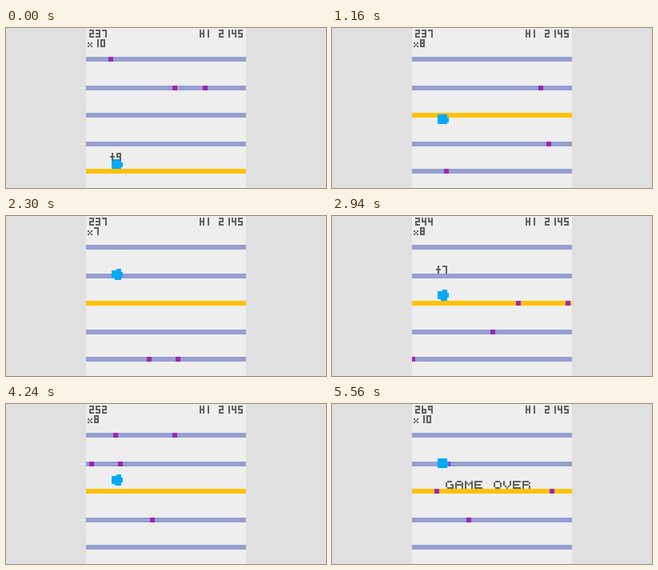
These frames come from a looping animation (400 by 200 pixels, 6000 ms). An HTML page with a canvas:

```html
<!DOCTYPE html>
<html lang="en">
<head>
<meta charset="utf-8">
<title>Lane runner</title>
<style>
  html, body { margin: 0; width: 100%; height: 100%; overflow: hidden; background: #e0e0e0; }
  canvas { display: block; }
</style>
</head>
<body>
<canvas id="stage" width="400" height="200" role="img" aria-label="Lane runner game, HI 2145, ending in GAME OVER"></canvas>
<script>
const ctx = document.getElementById('stage').getContext('2d');
const LOOP = 6000, STEP = 20, LAST = 278;
const LANES = [39, 75, 109, 145, 179];
const LEDGES = LANES.map(y => y - 9);
const INK = '#616161', LANE = '#969fd1', GOAL = '#ffc107', HAZARD = '#9c27b0', HERO = '#03a9f4';

// Stroke lettering on a unit grid; small glyphs are 3 x 5, large ones 5 x 5.
const SMALL = {
  0: 'M0 0H2V4H0Z', 1: 'M2 0V4', 2: 'M0 0H2V2H0V4H2', 3: 'M0 0H2V4H0M0 2H2',
  4: 'M0 0V2H2M2 0V4', 5: 'M2 0H0V2H2V4H0', 6: 'M0 0V4H2V2H0', 7: 'M0 0H2V4',
  8: 'M0 0H2V4H0ZM0 2H2', 9: 'M2 4V0H0V2H2', H: 'M0 0V4M2 0V4M0 2H2', I: 'M1 0V4',
  '+': 'M1 0V4M0 2H2', x: 'M0 2h.01M2 2h.01M1 3h.01M0 4h.01M2 4h.01'
};
const LARGE = {
  G: 'M3 0H1M0 1V3M1 4H4V2H3', A: 'M1 0H3M0 1V4M4 1V4M0 2H4',
  M: 'M0 0V4M4 0V4M1 1h.01M3 1h.01M2 2h.01', E: 'M4 0H0V4H4M0 2H3',
  O: 'M1 0H3M4 1V3M3 4H1M0 3V1', V: 'M0 0V2M4 0V2M1 3h.01M3 3h.01M2 4h.01',
  R: 'M0 4V0H3M4 1h.01M0 2H3M4 3V4'
};

// Player input: step -> launch speed; a dive drops through every lane but the goal.
const GRAVITY = .3, DIVE = 0;
const TAPS = {
  2: -2.4, 21: DIVE, 34: -6, 54: -6, 68: -6.1, 98: DIVE, 120: -4.1, 148: DIVE,
  168: -3.9, 188: -5.3, 218: DIVE, 234: -4.9, 249: -5.3, 266: DIVE
};
// Hazard places along each scrolling lane
const TRACKS = [
  [131, 894, 968],
  [211, 249, 466, 864, 900, 1085, 1142],
  [756, 818, 1127, 1272],
  [476, 724, 940, 1168],
  [348, 588, 624]
];

const snap = v => Math.round(v / 2) * 2;
const scroll = n => 3.53 * n + .0002 * n * n;
const goalAt = n => n < 2 ? 4 : 2;

// Play the round once, keeping a snapshot of every step.
function play() {
  const frames = [], popups = [{ start: -4, str: '+9', y: LEDGES[4] + 4 }];
  let y = LEDGES[4], vy = 0, airborne = false, diving = false, score = 237, mult = 10;

  function land(lane, n) {
    y = LEDGES[lane];
    airborne = diving = false;
    if (lane === goalAt(n)) {
      popups.push({ start: n, str: '+' + mult, y: y + 4 });
      score += mult++;
    } else {
      mult--;
    }
  }

  for (let n = 0; n <= LAST; n++) {
    if (airborne) {
      const before = y;
      y += vy + GRAVITY / 2;
      vy += GRAVITY;
      const lane = LEDGES.findIndex((ledge, i) => {
        if (diving && i !== goalAt(n)) return false;
        const fellOnto = vy > 0 && before < ledge && y >= ledge;
        const steppedUp = vy > -1.5 && vy < 0 && y >= ledge && y < ledge + 3;
        return fellOnto || steppedUp;
      });
      if (lane >= 0) land(lane, n);
    }
    frames.push({ y, airborne, score, mult });
    if (n in TAPS) {
      vy = TAPS[n];
      airborne = true;
      diving = vy === DIVE;
    }
  }
  return { frames, popups };
}
const { frames, popups } = play();

function box(color, x, y, w, h) {
  ctx.fillStyle = color;
  ctx.fillRect(x, y, w, h);
}

function write(str, x, y, font = SMALL, advance = 8) {
  ctx.strokeStyle = INK;
  ctx.lineCap = 'square';
  [...String(str)].forEach((ch, i) => {
    if (!font[ch]) return;
    ctx.save();
    ctx.translate(x + i * advance + 1, y + 1);
    ctx.scale(2, 2);
    ctx.stroke(new Path2D(font[ch]));
    ctx.restore();
  });
}

function drawHazards(n) {
  TRACKS.forEach((track, lane) => {
    for (const place of track) box(HAZARD, snap(place - scroll(n) - 3), LANES[lane] - 3, 6, 6);
  });
}

function drawHero(n, { y, airborne }) {
  const tumbling = airborne && n % 10 < 8;
  const top = snap(y - (tumbling ? 7 : 6));
  if (tumbling) {
    box(HERO, 138, top, 6, 2);
    box(HERO, 132, top + 2, 12, 10);
    box(HERO, 144, top + 4, 2, 6);
    box(HERO, 136, top + 12, 8, 2);
  } else {
    box(HERO, 132, top, 12, 12);
    box(HERO, 144, top + 4, 2, 6);
  }
}

function draw(n) {
  const now = frames[n];
  box('#e0e0e0', 0, 0, 400, 200);
  ctx.save();
  ctx.beginPath();
  ctx.rect(100, 0, 200, 200);
  ctx.clip();
  box('#eee', 100, 0, 200, 200);
  LANES.forEach((y, i) => box(i === goalAt(n) ? GOAL : LANE, 100, y - 3, 200, 6));
  drawHazards(n);
  drawHero(n, now);

  write(now.score, 104, 2);
  write('HI 2145', 242, 2);
  write('x' + now.mult, 102, 14);
  for (const { start, str, y } of popups) {
    const age = n - start;
    if (age >= 0 && age < 30) write(str, 130, snap(y - 40 * (1 - .9 ** age) - 5));
  }
  if (n === LAST) write('GAME OVER', 142, 96, LARGE, 12);
  ctx.restore();
}

const begin = performance.now();
function tick() {
  const t = (performance.now() - begin) % LOOP;
  draw(Math.min(LAST, Math.floor(t / STEP)));
  requestAnimationFrame(tick);
}
tick();
</script>
</body>
</html>
```
